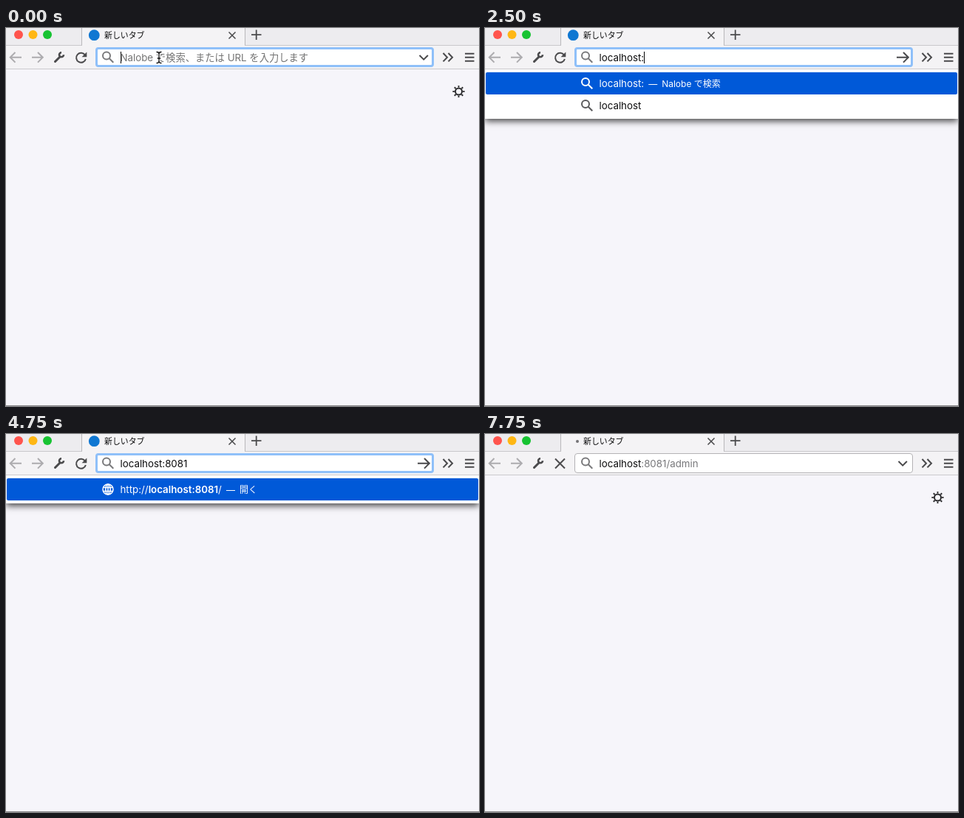
These frames come from a looping animation (640x512 px, 8 s). An HTML page:

```html
<!DOCTYPE html>
<html lang="ja">
<head>
<meta charset="utf-8">
<title>Address bar</title>
<style>
html, body { margin: 0; width: 100%; height: 100%; overflow: hidden; }
#stage {
  position: relative; width: 640px; height: 512px; overflow: hidden;
  background: #f6f5fa; color: #0c0c0d;
  font: 13.3px/26px Inter, "Noto Sans CJK JP", sans-serif; white-space: pre;
}
#stage > * { position: absolute; }
svg { left: 0; top: 0; overflow: visible; }
.line { fill: none; stroke: currentColor; stroke-width: 2; }
.chrome { left: 0; top: 0; width: 640px; height: 55px; background: #f4f3f5; border-bottom: 1px solid #cbcacd; }
.strip { position: absolute; top: 0; height: 23px; background: #edecef; border-bottom: 1px solid #c9c8cb; }
#title { left: 133px; top: -3px; font-size: 10.9px; }
#bar {
  left: 121px; top: 26px; width: 458px; height: 27px; box-sizing: border-box;
  background: #fff; border: 1px solid #b4b3b6; border-radius: 4px;
}
#bar.focus { border: 3px solid #8fc0f9; }
#url { left: 154.5px; top: 27px; }
.hint { color: #737373; }
.rest { color: #77777a; }
#caret { display: inline-block; width: 1px; height: 16px; margin-right: -1px; vertical-align: -3px; background: #000; }
#list {
  left: 0; top: 56px; width: 640px; padding: 4px 0; background: #fff;
  box-shadow: 0 3px 9px rgba(0, 0, 0, .75);
}
.row { position: relative; height: 29.5px; line-height: 30px; margin: 0 1px; padding-left: 153.5px; border-radius: 2px; }
.row svg { position: absolute; }
.row.on { background: #0059d8; color: #fff; }
.row b { font-weight: 600; }
.sub { font-size: 12px; }
.dash { display: inline-block; width: 24px; text-align: center; color: #777; }
.on .dash { color: #fff; }
.use { color: #0b807c; }
.edge { left: 0; top: 511px; width: 640px; height: 1px; background: #8a898c; }
</style>
</head>
<body>
<div id="stage">
  <svg id="gear" width="640" height="120" color="#2a2a2c">
    <circle class="line" cx="612.5" cy="86" r="4.5"/>
    <circle class="line" cx="612.5" cy="86" r="6.8" style="stroke-width:2.6" pathLength="16" stroke-dasharray=".7 1.3" stroke-dashoffset=".35"/>
  </svg>
  <div id="list"></div>
  <div class="chrome">
    <div class="strip" style="left:0;width:102px;border-right:1px solid #b9b8bb"></div>
    <div class="strip" style="left:323px;width:317px;border-left:1px solid #b9b8bb"></div>
  </div>
  <div id="title">新しいタブ</div>
  <div id="bar"></div>
  <svg width="640" height="56" color="#4a4a4c">
    <defs>
      <g id="find" class="line"><circle cx="-2" cy="-2" r="5"/><path d="M1.8 1.8 7.3 7.3"/></g>
      <g id="globe" class="line" style="stroke-width:1.5"><circle r="7"/><ellipse rx="3.2" ry="7"/><path d="M0-7V7M-6.3-2.6H6.3M-6.3 2.6H6.3"/></g>
      <path id="laptop" fill="currentColor" d="M-5.5 3V-4Q-5.5-5.5-4-5.5H4Q5.5-5.5 5.5-4V3L8 4.5V5.5H-8V4.5Z"/>
    </defs>
    <circle cx="17" cy="9" r="6" fill="#ff544d"/>
    <circle cx="36.5" cy="9" r="6" fill="#ffb714"/>
    <circle cx="56" cy="9" r="6" fill="#17c332"/>
    <circle id="icon" cx="119.3" cy="9.7" r="7.4" fill="#0f77d2"/>
    <circle id="dot" cx="125" cy="10" r="2" fill="#737375"/>
    <path class="line" style="stroke-width:1.5" d="M301.5 5.5l9 9m0-9l-9 9"/>
    <path class="line" style="stroke-width:1.8" d="M338.7 2.5v13.5M332 9.2h13.5"/>
    <path class="line" color="#adacaf" d="M21 39.8H6M12.5 33l-6.8 6.8 6.8 6.8M35 39.8h14.5M43 33l6.8 6.8-6.8 6.8"/>
    <path class="line" style="stroke-width:3;stroke-linecap:round" d="M66.5 45.5l6-6"/>
    <path class="line" style="stroke-width:2.6" d="M78 36.3a3 3 0 1 1-3-3"/>
    <g id="reload"><path class="line" d="M107 36.6A6.5 6.5 0 1 0 107.9 42"/><path fill="currentColor" d="M109.3 32.5v6.7h-6.7z"/></g>
    <path id="stop" class="line" d="M95 33.5l13 13m0-13l-13 13"/>
    <use href="#find" x="138" y="39.5" color="#7a7a7c"/>
    <path id="drop" class="line" d="M559.5 37l5.7 5.7 5.7-5.7"/>
    <path id="go" class="line" d="M557 39.8h15.5M566 33l6.8 6.8-6.8 6.8"/>
    <path class="line" d="M591.5 34l5.5 5.7-5.5 5.7M598.5 34l5.5 5.7-5.5 5.7"/>
    <path class="line" d="M621 34.8h12.5M621 39.8h12.5M621 44.8h12.5"/>
  </svg>
  <div id="url"></div>
  <svg id="beam" width="640" height="56">
    <g fill="none" stroke-linecap="round">
      <path id="ib" stroke="#fff" stroke-width="3" d="M204 32.5q3 0 3 2.5v10q0 2.5-3 2.5M210 32.5q-3 0-3 2.5v10q0 2.5 3 2.5M205.2 41h3.6"/>
      <use href="#ib" style="stroke:#111"/>
      <path stroke="#111" stroke-width="1.3" d="M204 32.5q3 0 3 2.5v10q0 2.5-3 2.5M210 32.5q-3 0-3 2.5v10q0 2.5 3 2.5M205.2 41h3.6"/>
    </g>
  </svg>
  <div class="edge"></div>
</div>
<script>
const $ = id => document.getElementById(id);
const LOOP = 8000, STEP = 250, LEAVE = 7500, LOAD = 7750;
const ADDRESS = "localhost:8081/admin";
const ENGINE = "Nalobe", USER = "hn4200", HOST = USER + "-lap2016-dev";

// [time, number of characters typed so far]
const KEYS = [
  [0, 0], [750, 1], [1000, 2], [1250, 3], [1500, 5], [1750, 6], [2000, 7],
  [2250, 9], [2500, 10], [3250, 11], [3750, 12], [4250, 14],
  [5250, 15], [5500, 16], [5750, 17], [6000, 18], [6250, 19], [6500, 20]
];

const icon = (name, x, color) =>
  `<svg width="1" height="1" style="left:${x - 1}px;top:15px" color="${color}"><use href="#${name}"/></svg>`;

function row({ pic, title, sub, device }, i) {
  const color = i ? (pic === "find" ? "#5a5a5c" : "#161618") : "#fff";
  const tail = sub ? `<span class="sub"><span class="dash">—</span><span class="${device ? "use" : ""}">${sub}</span></span>` : "";
  return `<div class="row${i ? "" : " on"}">${device ? icon("laptop", 116, "#636365") : ""}${icon(pic, 138, color)}${title}${tail}</div>`;
}

function results(text) {
  const n = text.length;
  const visit = title => ({ pic: "globe", title, sub: "開く" });
  const page = (title, rest) => ({ pic: "globe", title, sub: HOST + " 上で使用して" + rest, device: true });
  if (!n) return [];
  if (n < 9 || n === 10) {
    const list = [{ pic: "find", title: text, sub: ENGINE + " で検索" }];
    if (n > 6) list.push({ pic: "find", title: "localhost" });
    return list;
  }
  if (n === 9) return [visit(`http://<b>${text}</b>/`), { pic: "find", title: "localhost" }];
  if (n > 12) return [visit(`http://<b>${text}</b>${n === 14 ? "/" : ""}`)];
  return [
    visit(n === 12 ? "http://localhost/" : `http://<b>${text}</b>/`),
    page(`http://<b>${text}</b>${ADDRESS.slice(n)}`, "…"),
    page("Keycloak Admin Console", "いる …"),
    page("Log in to Keycloak", `いる ${USER} …`)
  ];
}

const show = (id, on) => { $(id).style.display = on ? "" : "none"; };

function draw(t) {
  const [since, count] = KEYS.filter(k => k[0] <= t).pop();
  const text = ADDRESS.slice(0, count);
  const left = t >= LEAVE, loading = t >= LOAD;
  const caret = !left && (t - since) % 1000 < 500 ? '<span id="caret"></span>' : "";
  const rows = left ? [] : results(text);

  $("url").innerHTML = left ? `localhost<span class="rest">${ADDRESS.slice(9)}</span>`
    : count ? text + caret
    : `${caret}<span class="hint">${ENGINE} で検索、または URL を入力します</span>`;
  $("list").innerHTML = rows.map(row).join("");
  $("bar").className = left ? "" : "focus";
  show("list", rows.length);
  show("gear", !rows.length);
  show("go", rows.length);
  show("drop", !rows.length);
  show("beam", !count);
  show("icon", !loading);
  show("dot", loading);
  show("reload", !loading);
  show("stop", loading);
}

let last = -1;
function tick() {
  const t = Math.floor(performance.now() % LOOP / STEP) * STEP;
  if (t !== last) draw(last = t);
  requestAnimationFrame(tick);
}
tick();
</script>
</body>
</html>
```
